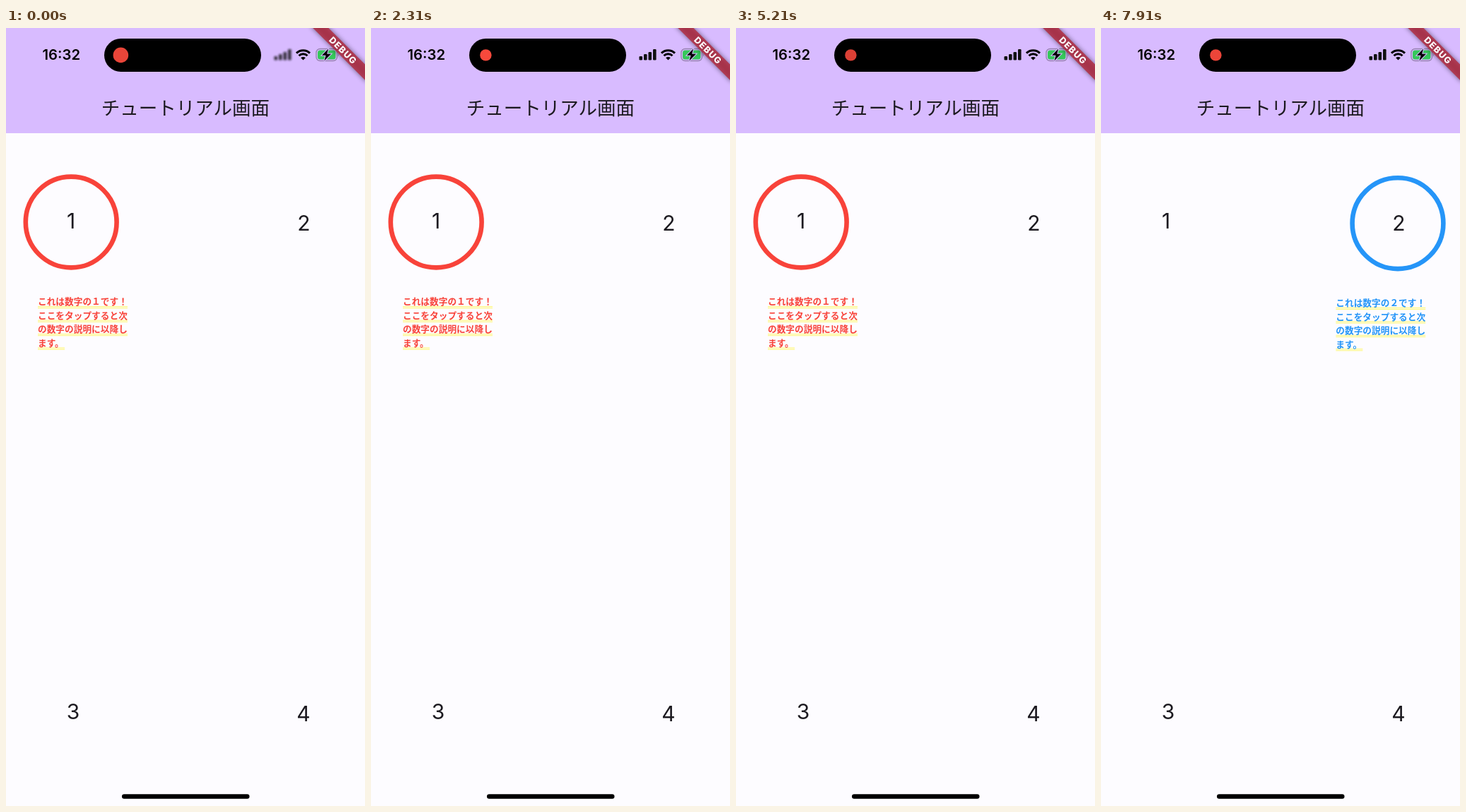
Animation, 508 px wide and 1102 px high, one loop 8000 ms. Source, as an HTML page:

```html
<!DOCTYPE html>
<html lang="ja">
<meta charset="utf-8">
<style>
  html, body { margin: 0; width: 100%; height: 100%; overflow: hidden; background: #fdfcff; }
  svg { display: block; width: 508px; height: 1102px; }
  text { font-family: Inter, "Noto Sans CJK JP", "Noto Sans CJK", sans-serif; fill: #1c1a20; }
  .digit { font-size: 30px; text-anchor: middle; }
  .note { font: 600 12.7px "Noto Sans CJK JP", "Noto Sans CJK", sans-serif; }
</style>
<svg viewBox="0 0 508 1102">
  <defs>
    <filter id="soft" x="-50%" y="-50%" width="200%" height="200%"><feGaussianBlur id="blur" stdDeviation="0"/></filter>
    <filter id="shade" x="-20%" y="-80%" width="140%" height="260%"><feGaussianBlur stdDeviation="3.5"/></filter>
  </defs>
  <rect width="508" height="149" fill="#d8bbff"/>

  <text x="51.5" y="45.3" font-size="20.3" font-weight="600" style="fill:#000">16:32</text>
  <rect x="139" y="15" width="222" height="47" rx="23.5"/>
  <circle id="dot" cx="162.4" cy="38.4" fill="#ff4b3e"/>

  <g id="bars" filter="url(#soft)" fill="#111">
    <rect x="379.5" y="40" width="4.6" height="5.5" rx="1.3"/>
    <rect x="386" y="37" width="4.6" height="8.5" rx="1.3"/>
    <rect x="392.5" y="34" width="4.6" height="11.5" rx="1.3"/>
    <rect x="399" y="30" width="4.6" height="15.5" rx="1.3"/>
  </g>
  <g fill="none" stroke="#000" stroke-width="3">
    <path d="M411 35.6a13.5 13.5 0 0 1 19 0M414.5 39.2a8.5 8.5 0 0 1 12 0"/>
    <path d="M420.5 45.6l-3.3-3.3a4.7 4.7 0 0 1 6.6 0z" fill="#000" stroke="none"/>
  </g>
  <rect x="439" y="29.5" width="29.5" height="17" rx="5.5" fill="none" stroke="#9783b0" stroke-width="1.4"/>
  <rect x="441" y="31.5" width="25.5" height="13" rx="3.5" fill="#36c75b"/>
  <path d="M470 35.5q2 2.5 0 5z" fill="#9783b0"/>
  <path d="M456 29.5l-9 9.3h5.6l-2.2 7.7 9.6-9.8h-5.8z" stroke="#d8bbff" stroke-width="2" paint-order="stroke"/>

  <g transform="translate(508 0) rotate(45)">
    <rect x="-56" y="36.5" width="112" height="15.6" fill="#000" opacity=".5" filter="url(#shade)"/>
    <rect x="-56" y="36.5" width="112" height="15.6" fill="#b5293d" fill-opacity=".8"/>
    <text x=".6" y="49" font-size="12.6" font-weight="800" letter-spacing="1.1" text-anchor="middle" style="fill:#fff">DEBUG</text>
  </g>

  <text x="134.8" y="122.8" font-size="26.5" font-weight="300">チュートリアル画面</text>
  <text class="digit" x="92" y="284">1</text>
  <text class="digit" x="421.5" y="287">2</text>
  <text class="digit" x="95" y="979">3</text>
  <text class="digit" x="421" y="982">4</text>
  <g id="steps"></g>
  <rect x="164" y="1085.3" width="180.5" height="6.4" rx="3.2"/>
</svg>
<script>
const $ = id => document.getElementById(id);
const LOOP = 8000, SWITCH = 5520;
const clamp = v => Math.max(0, Math.min(1, v));

function stepMarkup(number, color, cx, cy, left) {
  const lines = [`これは数字の${number}です！`, 'ここをタップすると次', 'の数字の説明に以降し', 'ます。'];
  const rows = lines.map((line, i) => {
    const y = cy + 117.3 + i * 19.5, right = left + line.length * 12.7;
    return `<path d="M${left} ${y + 2.3}H${right}M${left} ${y + 4.4}H${right}" stroke="#fff76a" stroke-width="1"/>
      <text class="note" x="${left}" y="${y}" style="fill:${color}">${line}</text>`;
  });
  return `<g><circle cx="${cx}" cy="${cy}" r="64.4" fill="none" stroke="${color}" stroke-width="6.6"/><g>${rows.join('')}</g></g>`;
}
$('steps').innerHTML = stepMarkup('１', '#f8433a', 92.2, 275, 45) + stepMarkup('２', '#2595f8', 420, 276.7, 332.3);
const [first, second] = $('steps').children;

function draw(now) {
  const t = now % LOOP;
  // The recording light breathes every four seconds and settles to its small size.
  $('dot').setAttribute('opacity', 0.925 + 0.075 * Math.cos((t - 2920) / 2000 * Math.PI));
  $('dot').setAttribute('r', 8.2 + 1.3 * (1 + Math.cos(clamp(t / 1350) * Math.PI)));

  const haze = 1 - clamp(t / 350);
  $('blur').setAttribute('stdDeviation', 1.5 * haze);
  $('bars').setAttribute('opacity', 1 - 0.2 * haze);

  first.style.display = t < SWITCH ? '' : 'none';
  second.style.display = t < SWITCH ? 'none' : '';
  second.lastChild.style.opacity = clamp((t - SWITCH) / 300);
  requestAnimationFrame(draw);
}
requestAnimationFrame(draw);
</script>
</html>
```
